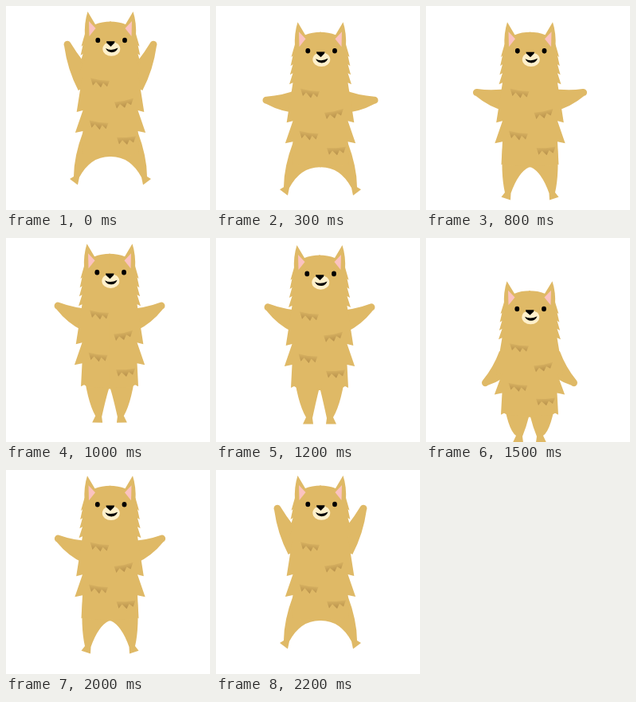
These frames come from a looping animation (256x256 px, 2.3 s). An HTML page with a canvas:

```html
<!DOCTYPE html>
<html>
<head>
<meta charset="utf-8">
<style>
html, body { margin: 0; width: 100%; height: 100%; overflow: hidden; background: #fff; }
canvas { display: block; }
</style>
</head>
<body>
<canvas id="stage" width="256" height="256"></canvas>
<script>
const ctx = document.getElementById('stage').getContext('2d');
const FUR = '#dfb966', PINK = '#fbc3c0', STEP = 100, STEPS = 23;
const MID = 131;
const TUFTS = [44, 55, 66, 78, 126, 152];

// Smooth 0..1 ramp that starts at `from` and takes `span` steps
function ease(t, from, span) {
  const x = Math.min(1, Math.max(0, (t - from) / span));
  return x * x * (3 - 2 * x);
}

function poseAt(t) {
  const toSquat = Math.min(Math.abs(t - 5.5), Math.abs(t - 15.6));
  const drop = Math.exp(-((toSquat / 2.25) ** 2.5));
  const press = drop ** 4;
  const spread = 1 - ease(t, 5.5, 5) + ease(t, 18, 4);
  const squash = 1 - (.075 + .045 * spread) * press;
  const top = 7 + 49 * drop;
  const crotch = top + 182 * squash;
  const degrees = 62 - 107 * ease(t, 0, 5.5) + 70 * ease(t, 5.8, 3)
    - 71 * ease(t, 12, 3) + 108 * ease(t, 17, 5);
  return {
    top, squash, spread, crotch,
    lift: degrees * Math.PI / 180,
    footX: 116 - 30 * spread,
    footY: crotch + 41 - Math.max(9 * spread ** 2, 12 * press)
  };
}

function poly(points, color) {
  ctx.fillStyle = color;
  ctx.beginPath();
  points.forEach(p => ctx.lineTo(...p));
  ctx.fill();
}

function oval(x, y, rx, ry, color) {
  ctx.fillStyle = color;
  ctx.beginPath();
  ctx.ellipse(x, y, rx, ry, 0, 0, 7);
  ctx.fill();
}

function scaled(scaleY, draw) {
  ctx.save();
  ctx.scale(1, scaleY);
  draw();
  ctx.restore();
}

function bothSides(draw) {
  draw();
  ctx.save();
  ctx.transform(-1, 0, 0, 1, 2 * MID, 0);
  draw();
  ctx.restore();
}

function arm({ top, squash, lift }) {
  const ux = -Math.cos(lift), uy = -Math.sin(lift);
  const reach = 41 + 27 * Math.max(0, -uy) ** 4;
  const sx = 104, sy = top + (99 + 8 * uy) * squash;
  const at = (along, side) =>
    [sx + ux * along + uy * side, sy + uy * along - ux * side];
  const angle = Math.atan2(-ux, uy);
  ctx.fillStyle = FUR;
  ctx.beginPath();
  ctx.moveTo(...at(0, 15));
  ctx.quadraticCurveTo(...at(reach / 2, 15), ...at(reach, 4.5));
  ctx.arc(...at(reach, 0), 4.5, angle, angle + Math.PI);
  ctx.quadraticCurveTo(...at(reach / 2, -6), ...at(0, -15));
  ctx.fill();
}

function leg({ top, squash, spread, crotch, footX: x, footY: y }) {
  const hip = top + 150 * squash, closed = 1 - spread;
  ctx.fillStyle = FUR;
  ctx.beginPath();
  ctx.moveTo(MID + 1, hip);
  ctx.lineTo(97, hip);
  ctx.quadraticCurveTo(103 - 18 * spread, crotch + 16 * closed, x - 2 + spread, y - 7);
  ctx.lineTo(x - 6, y + 1.5 - 5.5 * spread);
  ctx.lineTo(x + 7 - 3 * spread, y + 1.5 + 2 * spread);
  ctx.lineTo(x + 6, y - 6);
  ctx.quadraticCurveTo(127 - 21 * spread, crotch + 12 * closed, MID - 1, crotch);
  ctx.lineTo(MID + 1, crotch);
  ctx.fill();
}

function torsoSide() {
  const side = [[MID + 1, 28], [99, 28]];
  for (const y of TUFTS) {
    side.push([MID - 33.5 - .07 * y, y], [MID - 34.5, y - 2]);
  }
  side.push([95, 179], [99, 177], [104, 180], [MID + 1, 181]);
  poly(side, FUR);
}

function mark(x, y, tilt) {
  ctx.save();
  ctx.transform(1, tilt, 0, 1, x, y);
  const shade = ctx.createLinearGradient(0, -5, 0, 6);
  shade.addColorStop(0, 'rgba(176,137,70,.1)');
  shade.addColorStop(1, 'rgba(176,137,70,.85)');
  poly([[-12, -4], [-9, 5], [-5, 0], [1, 6], [4, 0], [9, 4], [12, -4], [0, -3]], shade);
  ctx.restore();
}

function torso() {
  bothSides(torsoSide);
  mark(118, 89, .14);
  mark(148, 115, -.2);
  mark(116.5, 142, .14);
  mark(151, 161, -.06);
}

function headSide() {
  ctx.fillStyle = FUR;
  ctx.beginPath();
  ctx.moveTo(MID + 1, 62);
  ctx.lineTo(99, 62);
  ctx.lineTo(96.5, 40);
  ctx.lineTo(99, 31);
  ctx.quadraticCurveTo(98, 14, 102.5, 0);
  ctx.lineTo(112, 16);
  ctx.quadraticCurveTo(120, 12.5, MID + 1, 12.5);
  ctx.fill();
  poly([[104, 12], [112.5, 21], [104.5, 31]], PINK);
}

function head() {
  bothSides(headSide);
  for (const x of [115.3, 149]) oval(x, 36, 2.9, 3.3, '#000');
  oval(132.3, 46.8, 11, 9, '#fff0cb');
  poly([[126, 37.3], [136.5, 37.3], [136, 39.5], [131.5, 44], [126.5, 39.5]], '#000');
  ctx.beginPath();
  ctx.moveTo(125, 46);
  ctx.quadraticCurveTo(132, 50, 140.5, 45.5);
  ctx.bezierCurveTo(138, 53, 128, 53, 125, 46);
  ctx.fill();
}

function draw(now) {
  const pose = poseAt(Math.floor(now / STEP) % STEPS);
  ctx.clearRect(0, 0, 256, 256);
  ctx.save();
  ctx.translate(pose.spread - 1, 0);
  bothSides(() => {
    leg(pose);
    arm(pose);
  });
  ctx.translate(0, pose.top);
  scaled(pose.squash, torso);
  scaled((1 + pose.squash) / 2, head);
  ctx.restore();
}

const start = performance.now();
function loop() {
  draw(performance.now() - start);
  requestAnimationFrame(loop);
}
loop();
</script>
</body>
</html>
```
